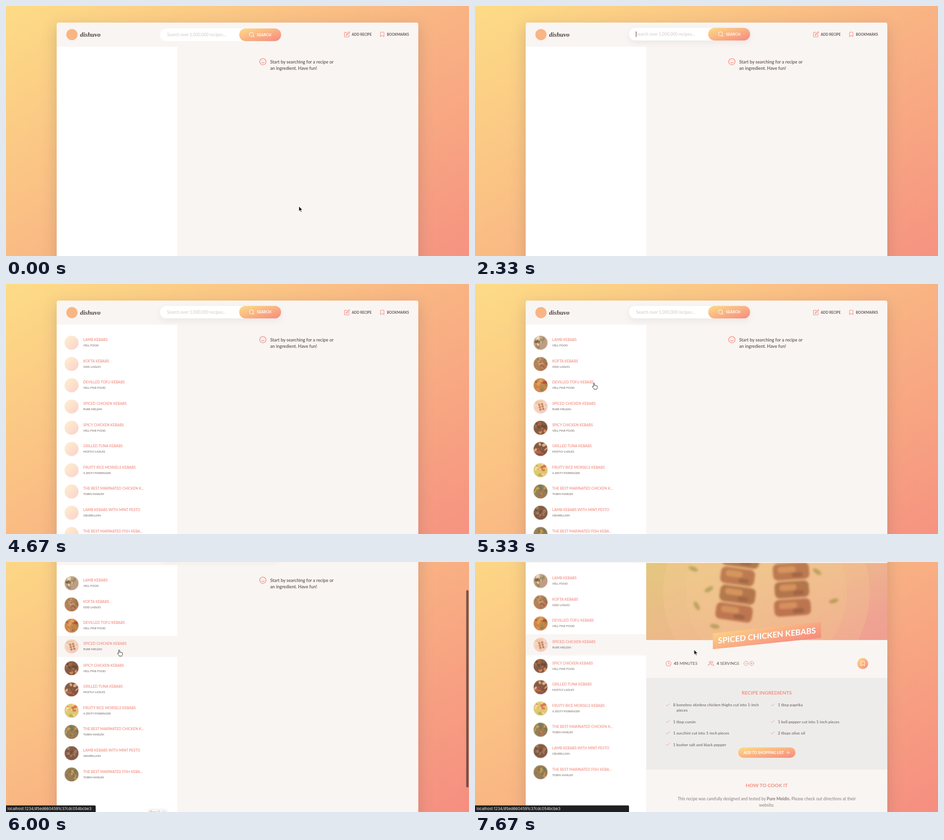
An HTML page for the animation above (8000 ms loop, 950 px wide and 513 px high).

```html
<!DOCTYPE html>
<html lang="en">
<head>
<meta charset="utf-8">
<title>Recipe search</title>
<style>
  html, body { margin: 0; width: 100%; height: 100%; overflow: hidden; background: #f9b785; }
  svg { display: block; width: 950px; height: 513px; font-family: Lato, "Open Sans", sans-serif; }
  .b { font-weight: 700; }
  .semi { font-weight: 600; }
  .mid { text-anchor: middle; }
  .line { fill: none; stroke-width: 2; stroke-linecap: round; stroke-linejoin: round; }
  .dark { fill: #615551; }
  .head { font-size: 10.1px; font-weight: 700; fill: #f38e82; text-anchor: middle; }
</style>
</head>
<body>
<svg id="stage" viewBox="0 0 950 513" xmlns="http://www.w3.org/2000/svg"></svg>
<script>
const LOOP = 8000, PINK = '#f38e82', SCROLL = 81.6;

const rows = [
  ['LAMB KEBABS', 'VELL FOOD', 'b39c86 6e4d33 8a8458 e6dacd'],
  ['KOFTA KEBABS', 'ODD LADLES', 'a8764f 8a5c3e c99a70 7d7450'],
  ['DEVILLED TOFU KEBABS', 'VELL FINE FOOD', 'c47a3f a33f25 d99a55 7d8a45'],
  ['SPICED CHICKEN KEBABS', 'PURE MELDIN', 'f5dcd5 e9c9a8 f3d3c6 f7e6da'],
  ['SPICY CHICKEN KEBABS', 'VELL FINE FOOD', '6b4a38 a54d33 c98a55 4a3a2e'],
  ['GRILLED TUNA KEBABS', 'MOSTLY LADLES', '6a4434 d9b08a a8583e 7c5040'],
  ['FRUITY RICE MORSELS KEBABS', 'A ZESTY PORRINGER', 'd9cf6e d8674a f0e0a0 a8b55a'],
  ['THE BEST MARINATED CHICKEN K...', 'TOBIN MARLEK', '7d7450 c99a3f 5f6a50 a86a3a'],
  ['LAMB KEBABS WITH MINT PESTO', 'GRUBELLION', '6a4a3a 9a4030 8a7058 4f3a30'],
  ['THE BEST MARINATED FISH KEBA...', 'TOBIN MARLEK', '7d7450 c99a3f 5f6a50 a86a3a']
];

const ring = 'M22 12a10 10 0 1 1-20 0 10 10 0 0 1 20 0z';
const icons = {
  edit: 'M11 4H4a2 2 0 0 0-2 2v14a2 2 0 0 0 2 2h14a2 2 0 0 0 2-2v-7M18.5 2.5a2.1 2.1 0 0 1 3 3L12 15l-4 1 1-4z',
  mark: 'M19 21l-7-5-7 5V5a2 2 0 0 1 2-2h10a2 2 0 0 1 2 2z',
  find: 'M19 11a8 8 0 1 1-16 0 8 8 0 0 1 16 0zM21 21l-4.35-4.35',
  smile: ring + 'M8 14s1.5 2 4 2 4-2 4-2M9 9h.01M15 9h.01',
  clock: ring + 'M12 6v6l4 2',
  users: 'M17 21v-2a4 4 0 0 0-4-4H5a4 4 0 0 0-4 4v2M13 7a4 4 0 1 1-8 0 4 4 0 0 1 8 0zM23 21v-2a4 4 0 0 0-3-3.87M16 3.13a4 4 0 0 1 0 7.75',
  minus: ring + 'M8 12h8',
  plus: ring + 'M12 8v8M8 12h8',
  check: 'M20 6L9 17l-5-5',
  arrow: 'M5 12h14M12 5l7 7-7 7'
};

const icon = (name, cx, cy, size, color = PINK) =>
  `<path class="line" stroke="${color}" d="${icons[name]}" transform="translate(${cx} ${cy}) scale(${size / 24}) translate(-12 -12)"/>`;
const text = (x, y, size, str, attrs = 'class="dark"') =>
  `<text x="${x}" y="${y}" font-size="${size}" ${attrs}>${str}</text>`;
const pill = (x, y, w, h, fill) =>
  `<rect x="${x}" y="${y}" width="${w}" height="${h}" rx="${h / 2}" fill="${fill}"/>`;

let seed = 7;
const rnd = () => (seed = (seed * 16807) % 2147483647) / 2147483647;

function photo(i) {
  const [base, ...tones] = rows[i][2].split(' ');
  let out = `<circle r="14.4" fill="#${base}"/>`;
  for (let k = 0; k < 14; k++) {
    const a = rnd() * 6.28, r = 12 * Math.sqrt(rnd());
    out += `<ellipse rx="${2 + rnd() * 3}" ry="${1.2 + rnd() * 2}" fill="#${tones[k % 3]}"
      transform="translate(${r * Math.cos(a)} ${r * Math.sin(a)}) rotate(${rnd() * 180})"/>`;
  }
  if (i === 3) {
    for (const x of [-4, 2]) for (const y of [-6, -1, 4])
      out += `<rect x="${x}" y="${y}" width="4.4" height="4.2" rx="1.3" fill="#b57a4e" transform="rotate(-14)"/>`;
  }
  return `<g clip-path="url(#disc)">${out}<circle r="14.4" fill="url(#warm)" opacity=".18"/></g>`;
}

const row = ([title, by], i) => {
  const y = 98.8 + 43.6 * i;
  return `<g id="row${i}">
    <rect id="bg${i}" x="104" y="${y}" width="247.3" height="43.6" fill="#f9f5f3" opacity="0"/>
    <g transform="translate(134.5 ${y + 21.7})">
      <circle r="14.4" fill="url(#warm)" opacity=".4"/><g id="photo${i}">${photo(i)}</g>
    </g>
    ${text(158.5, y + 18.4, 7.35, title, `class="semi" fill="${PINK}"`)}
    ${text(158.5, y + 29.4, 5.8, by, 'class="semi" fill="#82766f"')}
  </g>`;
};

const spinner = (id, x, y) => {
  let rays = '';
  for (let a = 0; a < 360; a += 45)
    rays += `<path d="M0-8V-12.4" transform="rotate(${a})"/>`;
  return `<g id="${id}" transform="translate(${x} ${y})"><g class="rays" stroke="${PINK}" stroke-width="2.4" stroke-linecap="round">${rays}</g></g>`;
};

function dish() {
  const skewer = (x, y, n, turn) => {
    let out = '';
    for (let k = 0; k < n; k++) {
      const px = -36 + rnd() * 8, w = 68 + rnd() * 10;
      out += `<rect x="${px}" y="${k * 37}" width="${w}" height="34" rx="10" fill="${k % 2 ? '#a9623f' : '#9c6038'}"/>
        <rect x="${px + 10}" y="${k * 37 + 6}" width="${w * .5}" height="13" rx="6" fill="#c98650"/>
        <rect x="${px + 38}" y="${k * 37 + 20}" width="${w * .3}" height="9" rx="4" fill="#854a32"/>`;
    }
    return `<g transform="translate(${x} ${y}) rotate(${turn})">${out}</g>`;
  };
  const leaves = [[448, 14, 20], [480, 56, -30], [492, 132, 12], [702, 20, 35], [736, 80, -15], [455, 90, 60]];
  return `<g clip-path="url(#hero)">
    <rect x="351" y="1.9" width="495" height="158.4" fill="url(#photoTone)"/>
    <circle cx="598" cy="62" r="212" fill="#f0c594" opacity=".45"/>
    <circle cx="598" cy="62" r="165" fill="#efc793" opacity=".5"/>
    <g style="filter:blur(2px)">
      ${skewer(545, -24, 4, 8)}${skewer(638, -34, 4, -4)}
      ${leaves.map(([x, y, a]) => `<ellipse rx="10" ry="4.5" fill="#a79a50" transform="translate(${x} ${y}) rotate(${a})"/>`).join('')}
    </g>
    <rect x="351" y="1.9" width="495" height="158.4" fill="url(#warm)" opacity=".25"/>
  </g>`;
}

const item = (x, y, str) => icon('check', x - 10.7, y - 3.1, 10.5) + text(x, y, 8.2, str);

const recipe = `<g id="recipe"><g transform="translate(0 ${SCROLL})">
  <rect x="351.3" y="1.9" width="494.7" height="560" fill="#f9f5f3"/>
  ${dish()}
  <g transform="translate(599 151) skewY(-6)">
    <rect x="-111" y="-16.3" width="222" height="32.6" fill="url(#warm2)"/>
    ${text(0, 5.8, 16.5, 'SPICED CHICKEN KEBABS', 'class="b mid" fill="#fff"')}
  </g>
  ${icon('clock', 397, 208.4, 12.4)}
  ${text(408, 211.4, 8.3, '<tspan class="b">45</tspan> MINUTES')}
  ${icon('users', 484.3, 208.4, 12.4)}
  ${text(496, 211.4, 8.3, '<tspan class="b">4</tspan> SERVINGS')}
  ${icon('minus', 556, 208, 10.6)}${icon('plus', 567.5, 208, 10.6)}
  <circle cx="795.5" cy="208.3" r="11.2" fill="url(#warm)"/>
  ${icon('mark', 795.5, 208.3, 12, '#fff')}
  <rect x="351.3" y="238" width="494.7" height="188" fill="#eeecea"/>
  <text class="head" x="598.5" y="272">RECIPE INGREDIENTS</text>
  ${item(406.5, 296.4, '8 boneless skinless chicken thighs cut into 1-inch')}
  ${text(413.7, 307.3, 8.2, 'pieces')}
  ${item(406.5, 330.5, '1 tbsp cumin')}
  ${item(406.5, 354, '1 zucchini cut into 1-inch pieces')}
  ${item(406.5, 377.5, '1 kosher salt and black pepper')}
  ${item(621.5, 296.4, '1 tbsp paprika')}
  ${item(621.5, 330.5, '1 bell pepper cut into 1-inch pieces')}
  ${item(621.5, 354, '2 tbsps olive oil')}
  ${pill(540, 380.5, 117.5, 21.2, 'url(#warm)')}
  ${text(551, 393.7, 7.25, 'ADD TO SHOPPING LIST', 'class="b" fill="#fff"')}
  ${icon('arrow', 642, 391.1, 10, '#fff')}
  <text class="head" x="598.5" y="462">HOW TO COOK IT</text>
  ${text(598.5, 488.7, 8.6, 'This recipe was carefully designed and tested by <tspan class="b">Pure Meldin.</tspan> Please check out directions at their', 'class="mid" fill="#8a7d79"')}
  ${text(598.5, 502, 8.6, 'website.', 'class="mid" fill="#8a7d79"')}
</g></g>`;

const stops = '<stop stop-color="#fddc86"/><stop offset="1" stop-color="#f58a80"/>';
document.getElementById('stage').innerHTML = `
<defs>
  <linearGradient id="warm" x2="1" y2="1">${stops}</linearGradient>
  <linearGradient id="warm2" x1="-.3" x2="1" y2="1">${stops}</linearGradient>
  <linearGradient id="photoTone" x2="1" y2=".6"><stop stop-color="#dcc07c"/><stop offset=".5" stop-color="#e8bb8c"/><stop offset="1" stop-color="#eda698"/></linearGradient>
  <clipPath id="disc"><circle r="14.4"/></clipPath>
  <clipPath id="hero"><rect x="351.3" y="1.9" width="494.7" height="158.4"/></clipPath>
</defs>
<g id="page">
  <rect width="950" height="650" fill="url(#warm)"/>
  <rect x="101.5" y="41.5" width="747" height="584" rx="5" fill="#615551" opacity=".22" style="filter:blur(15px)"/>
  <rect x="104" y="34" width="742" height="579" rx="4" fill="#f9f5f3"/>
  <rect x="104" y="83.5" width="247.3" height="529.5" fill="#fff"/>

  <circle cx="135.3" cy="58.7" r="11.5" fill="#f9b583"/>
  ${text(152, 63, 13, 'dishuvo', 'fill="#4a3f3b" style="font:italic 700 13px \'Liberation Serif\',serif"')}

  <rect id="glow" x="316" y="49.5" width="248.5" height="26" rx="13" fill="#615551" opacity="0" style="filter:blur(7px)"/>
  <g id="form">
    ${pill(316, 46, 248.5, 26, '#fff')}${pill(478.5, 46, 86, 26, 'url(#warm)')}
    ${icon('find', 504.2, 58.9, 12.6, '#fff')}
    ${text(514.8, 61.6, 7.6, 'SEARCH', 'class="b" fill="#fff"')}
    ${text(330.5, 62, 8.64, 'Search over 1,000,000 recipes...', 'id="hint" fill="#d3c7c3"')}
    ${['K', 'Ke', 'Keb', 'Kebab'].map((s, i) => text(330.5, 62, 8.64, s, `id="typed${i}" class="dark"`)).join('')}
    <g id="caret"><rect x="330" y="53.4" width=".9" height="11.4" fill="#3c3431"/></g>
  </g>

  ${icon('edit', 699.7, 58.3, 12.6)}${text(709.5, 61, 7, 'ADD RECIPE', 'class="b dark"')}
  ${icon('mark', 772, 58.3, 12.2)}${text(781.5, 61, 7, 'BOOKMARKS', 'class="b dark"')}

  <g id="message">
    ${icon('smile', 527, 114.3, 15.6)}
    ${text(542, 117.6, 9.15, 'Start by searching for a recipe or', 'class="semi dark"')}
    ${text(542, 131, 9.15, 'an ingredient. Have fun!', 'class="semi dark"')}
  </g>
  ${spinner('listSpin', 227.6, 137.6)}
  <g id="list">${rows.map(row).join('')}</g>
  <g id="pager">
    ${pill(289, 583, 44, 14.4, '#f9f5f3')}
    ${text(295, 592.6, 6.8, 'Page 2', `class="semi" fill="${PINK}"`)}
    ${icon('arrow', 323.5, 590.2, 8.6)}
  </g>
  ${spinner('mainSpin', 598.5, 122.9)}
  ${recipe}
</g>
<g id="bar"><rect x="944.3" y="9" width="4.7" height="405" rx="2.35" fill="#4a3a33" opacity=".75"/></g>
<g id="status" font-family="Inter, Roboto, sans-serif">
  <path id="short" d="M0 499.5H182a2 2 0 0 1 2 2V513H0z" fill="#1f1f21"/>
  <path id="wide" d="M0 499.5H314a2 2 0 0 1 2 2V513H0z" fill="#1f1f21"/>
  ${text(3, 509.1, 7.8, 'localhost:1234/#5ed6604691c37cdc054bd01b', 'id="url0" fill="#f2f2f2"')}
  ${text(3, 509.1, 7.8, 'localhost:1234/#5ed6604591c37cdc054bcbe3', 'id="url1" fill="#f2f2f2"')}
</g>
<g id="cursor">
  <path id="pointer" d="M0 0V10.2L2.4 8l1.7 3.8 1.6-.7L4 7.4h3.3z" fill="#111" stroke="#fff" stroke-width=".7"/>
  <path id="beam" d="M0 0q2.5 0 2.5 1.5V10q0 1.5-2.5 1.5M5 0q-2.5 0-2.5 1.5V10q0 1.5 2.5 1.5" fill="none" stroke="#222" stroke-width=".9"/>
  <path id="hand" d="M3 1.5a1.1 1.1 0 0 1 2.2 0V5.5a1 1 0 0 1 2 .3 1 1 0 0 1 1.9.4 1 1 0 0 1 1.8.6V9.5c0 2-1 2.2-1.3 3.6H4.6C4 11.5 2 10 .9 8.2c-.6-1 .8-1.7 1.5-.8L3 8z" fill="#fff" stroke="#222" stroke-width=".9" stroke-linejoin="round"/>
</g>`;

// Each track is a table of [ms, value]; a value holds until the next one.
const find = id => typeof id === 'string' ? document.getElementById(id) : id;
function hold(id, prop, table) {
  const keys = table.map(([ms, v]) => ({ offset: ms / LOOP, [prop]: v, easing: 'steps(1, end)' }));
  keys.push({ offset: 1, [prop]: table[table.length - 1][1] });
  find(id).animate(keys, { duration: LOOP, iterations: Infinity });
}
function show(id, ...times) {
  const table = times.map((ms, i) => [ms, i % 2 ? 0 : 1]).filter(([ms]) => ms < LOOP);
  if (table[0][0] > 0) table.unshift([0, 0]);
  hold(id, 'opacity', table);
}
const move = (id, table) =>
  hold(id, 'transform', table.map(([ms, x, y]) => [ms, `translate(${x}px, ${y}px)`]));

move('cursor', [[0, 601, 411], [330, 598, 428], [670, 585, 400], [1000, 517, 272], [1330, 426, 117],
  [1670, 408, 65], [5000, 405, 60], [5330, 240, 203], [5670, 229, 225], [6000, 228, 180],
  [6330, 227, 165], [6670, 227, 159.5], [7330, 245, 166], [7670, 449.5, 180]]);
show('pointer', 0, 1670, 7670, LOOP);
show('beam', 1670, 2000, 5000, 5330);
show('hand', 5330, 7670);

move('form', [[0, 0, 0], [2000, 0, -.7], [2330, 0, -1.2]]);
hold('glow', 'opacity', [[0, 0], [2000, .05], [2330, .09]]);
show('hint', 0, 2670, 4000, LOOP);
[2670, 3000, 3330, 3670, 4000].forEach((ms, i, all) => i < 4 && show('typed' + i, ms, all[i + 1]));
show('caret', 2000, 4000, 4330, 4670, 5000, 5330, 5670, 6000);
move('caret', [[0, 0, 0], [2670, 5.8, 0], [3000, 10.4, 0], [3330, 15.3, 0], [3670, 24, 0], [4000, 0, 0]]);

show('listSpin', 4000, 4670);
show('mainSpin', 7000, 7330);
document.querySelectorAll('.rays').forEach(el =>
  hold(el, 'transform', [[0, 'rotate(0deg)'], [4330, 'rotate(60deg)'], [7000, 'rotate(10deg)']]));

show('list', 4670, LOOP);
rows.forEach((_, i) => show('photo' + i, i < 6 ? 5000 : 5330, LOOP));
show('bg2', 5670, 6000);
show('bg3', 6000, LOOP);
move('row2', [[0, 0, 0], [5670, 0, -1.2], [6000, 0, 0]]);
move('row3', [[0, 0, 0], [6000, 0, -1.2], [7670, 0, 0]]);
show('pager', 4670, 7330);
show('message', 0, 7000);
show('recipe', 7330, LOOP);

const scroll = [[0, 0], [5670, 15.4], [6000, 77], [6330, SCROLL]];
move('page', scroll.map(([ms, y]) => [ms, 0, -y]));
move('bar', scroll.map(([ms, y]) => [ms, 0, Math.max(0, (y - 15.4) * .79)]));
show('bar', 5670, 6670);
show('status', 5670, LOOP);
show('short', 5670, 6330);
show('wide', 6330, LOOP);
show('url0', 5670, 6000);
show('url1', 6000, LOOP);
</script>
</body>
</html>
```
